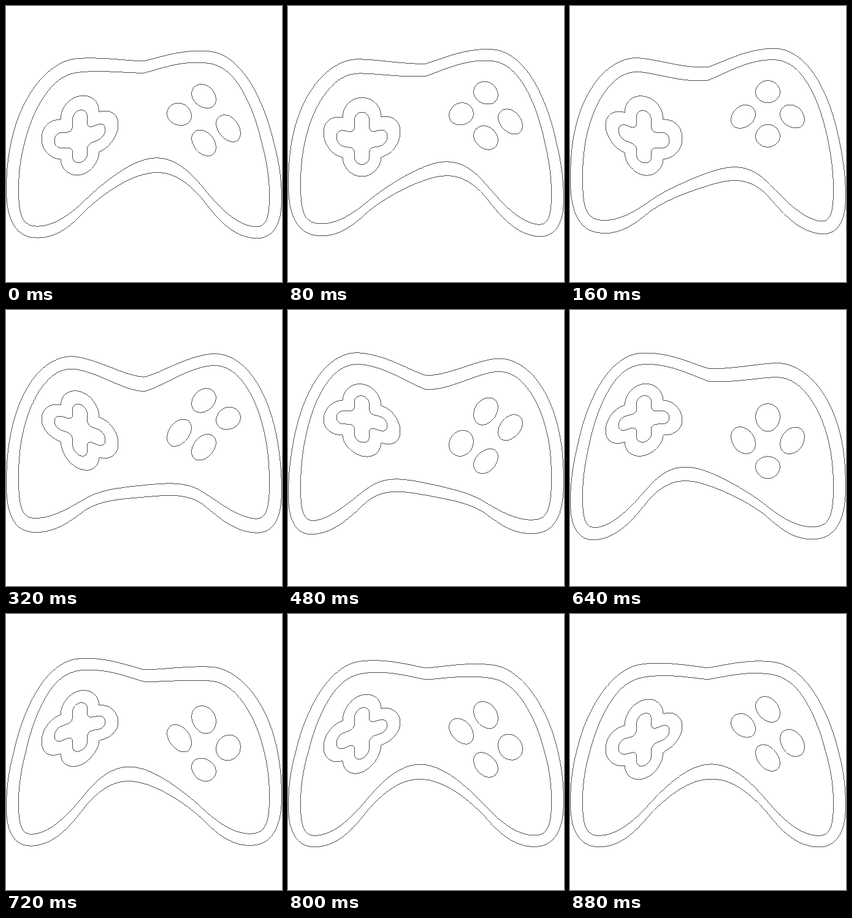
These frames come from a looping animation (450x450 px, 0.96 s). An HTML page:

```html
<!DOCTYPE html>
<html lang="en">
<head>
<meta charset="utf-8">
<title>Wavy gamepad</title>
<style>
  html, body { margin: 0; width: 100%; height: 100%; overflow: hidden; background: #fff; }
  svg { display: block; width: 450px; height: 450px; }
  #ink { fill: none; stroke: #222; stroke-width: .8; shape-rendering: crispEdges; }
</style>
</head>
<body>
<svg viewBox="0 0 450 450"><path id="ink"/></svg>
<script>
const SIZE = 450, MID = SIZE / 2;
const LOOP = 960, STEP = 80;
const WAVE = { length: 350, delay: 233.5, slope: 25.5 / MID };

// Left halves of the body, from the top notch to the bottom arch
const halves = [
  `M225 97.5 C197 94 155 77 115 77 C82 77 53 106 36 139
   C11 184 .5 248 .5 300 C.5 345 14 372 45 372
   C82 372 108 345 130 323 C158 299 188 289.5 225 289.5`,
  `M225 118.5 C197 115 155 97.5 118 97.5 C90 97.5 70 116 52 150
   C32 188 20.5 245 20.5 292 C20.5 330 24 351.5 45 351.5
   C75 351.5 105 326 130 304 C158 279.5 190 268 225 268`
];

const pad = `M89.25 164 a31.25 31.5 0 0 1 62.5 0 a31.25 31.5 0 0 1 0 63
  a31.25 31.5 0 0 1 -62.5 0 a31.25 31.5 0 0 1 0 -63`;

const cross = `M108.5 165.5 a12 12 0 0 1 24 0 v9.5 a8 8 0 0 0 8 8 h9.5
  a12 12 0 0 1 0 24 h-9.5 a8 8 0 0 0 -8 8 v9.5
  a12 12 0 0 1 -24 0 v-9.5 a8 8 0 0 0 -8 -8 h-9.5
  a12 12 0 0 1 0 -24 h9.5 a8 8 0 0 0 8 -8 z`;

const button = (x, y) =>
  `M${x - 19.8} ${y} a19.8 20 0 0 1 39.6 0 a19.8 20 0 0 1 -39.6 0`;

function sample(d) {
  const path = document.createElementNS("http://www.w3.org/2000/svg", "path");
  path.setAttribute("d", d);
  const total = path.getTotalLength();
  const count = Math.ceil(total / 1.5);
  return Array.from({ length: count + 1 }, (_, i) => {
    const { x, y } = path.getPointAtLength(total * i / count);
    return [x, y];
  });
}

const mirror = pts => pts.concat(pts.map(([x, y]) => [SIZE - x, y]).reverse());

const outlines = [
  ...halves.map(d => mirror(sample(d))),
  ...[pad, cross, button(322.5, 155.5), button(282.5, 195.3),
      button(362.5, 195.3), button(322.5, 235)].map(sample)
];

// Travelling vertical wave, strongest at mid-height and pinned at both edges
function warp(x, y, t) {
  const turn = (t - WAVE.delay) / LOOP - x / WAVE.length;
  const lift = WAVE.slope * Math.cos(2 * Math.PI * turn);
  const upper = y / (1 + lift);
  return upper <= MID ? upper : SIZE - (SIZE - y) / (1 - lift);
}

const trace = (pts, t) =>
  "M" + pts.map(([x, y]) => x.toFixed(2) + " " + warp(x, y, t).toFixed(2)).join("L") + "Z";

const ink = document.getElementById("ink");
let shown = -1;

function draw() {
  const t = Math.floor(performance.now() % LOOP / STEP) * STEP;
  if (t !== shown) {
    shown = t;
    ink.setAttribute("d", outlines.map(pts => trace(pts, t)).join(""));
  }
  requestAnimationFrame(draw);
}
draw();
</script>
</body>
</html>
```
